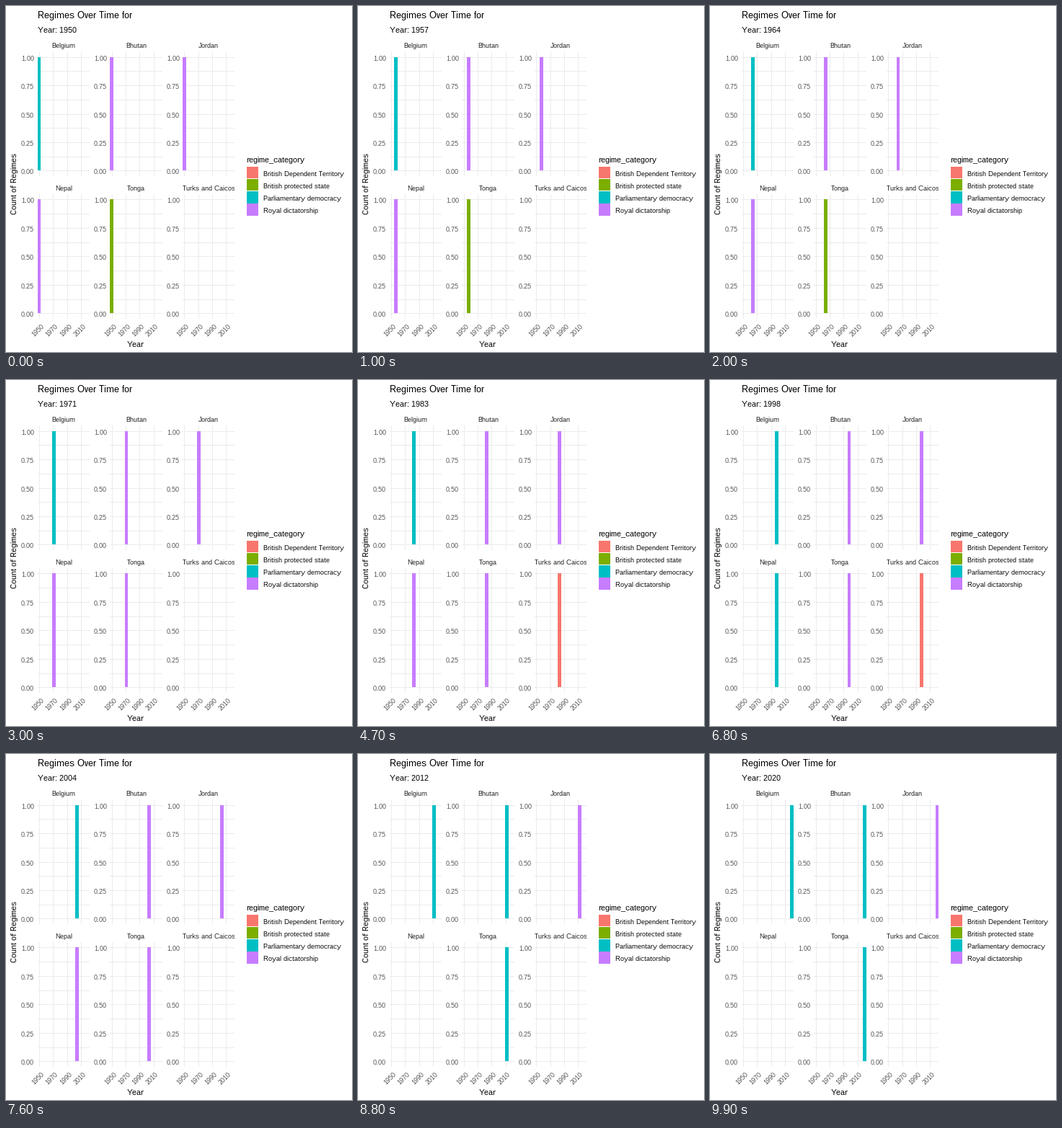
Animation, 480 px wide and 480 px high, one loop 10000 ms. Source, as a matplotlib script:

```python
import matplotlib.pyplot as plt
from matplotlib.animation import FuncAnimation
from matplotlib.patches import Rectangle

SIZE, DPI = 480, 100
FRAMES, INTERVAL = 100, 100
FIRST, LAST = 1950, 2020
SPAN = LAST - FIRST

plt.rcParams.update({
    "font.family": "Liberation Sans",
    "text.hinting": "native",
    "text.hinting_factor": 1,
})

GRID, AXIS_TEXT, DARK = "#EBEBEB", "#4D4D4D", "#1A1A1A"
DEPENDENT, PROTECTED, DEMOCRACY, ROYAL = "#F8766D", "#7CAE00", "#00BFC4", "#C77CFF"
LEGEND = [
    ("British Dependent Territory", DEPENDENT),
    ("British protected state", PROTECTED),
    ("Parliamentary democracy", DEMOCRACY),
    ("Royal dictatorship", ROYAL),
]

# country -> (start year, colour); None means no bar
REGIMES = {
    "Belgium": [(1950, DEMOCRACY)],
    "Bhutan": [(1950, ROYAL), (2008, DEMOCRACY)],
    "Jordan": [(1950, ROYAL)],
    "Nepal": [(1950, ROYAL), (1991, DEMOCRACY), (2002, ROYAL), (2008, None)],
    "Tonga": [(1950, PROTECTED), (1970, ROYAL), (2010, DEMOCRACY)],
    "Turks and Caicos": [(1950, None), (1981, DEPENDENT), (2002, None)],
}

# panel geometry in pixels, y pointing down
LEFT, COL_STEP, PANEL_W = 43.65, 100.69, 72.3
TOP, ROW_STEP, UNIT_H = 70.68, 197.79, 157.76
PAD = UNIT_H * 0.05
BAR_YEARS = 5
PER_YEAR = PANEL_W / (SPAN + BAR_YEARS)

fig = plt.figure(figsize=(SIZE / DPI, SIZE / DPI), dpi=DPI, facecolor="white")
ax = fig.add_axes([0, 0, 1, 1])
ax.set_xlim(0, SIZE)
ax.set_ylim(SIZE, 0)
ax.axis("off")


def box(x0, y0, x1, y1, color, z=1):
    """Filled rectangle on whole pixels."""
    x0, y0, x1, y1 = (round(v) for v in (x0, y0, x1, y1))
    return ax.add_patch(Rectangle((x0, y0), x1 - x0, y1 - y0, facecolor=color,
                                  linewidth=0, antialiased=False, zorder=z))


def label(x, y, s, px, color="black", ha="left", va="baseline", **kw):
    return ax.text(x, y, s, fontsize=px * 72 / DPI, color=color,
                   ha=ha, va=va, zorder=5, **kw)


def draw_panel(name, col, row):
    """Draw one facet and return its bar and left edge."""
    left = LEFT + col * COL_STEP
    right = left + PANEL_W
    top = TOP + row * ROW_STEP
    bottom = top + UNIT_H

    for i in range(9):
        y = round(bottom - UNIT_H * i / 8)
        box(left, y, right, y + 1, GRID)
        if i % 2 == 0:
            label(round(left - 4.5), y + 5, f"{i / 8:.2f}", 9, AXIS_TEXT, "right")

    for year in range(FIRST, LAST, 20):
        x = left + (year - FIRST + BAR_YEARS / 2) * PER_YEAR
        box(round(x), top - PAD, round(x) + 1, bottom + PAD, GRID)
        if row == 1:
            label(x - 1.5, 450.5, str(year), 9, AXIS_TEXT, "center", "center",
                  rotation=45)

    title = label((left + right) / 2, round(top - 12.8), name, 9, DARK, "center")
    strip = Rectangle((round(left), top - 30), round(right) - round(left), 24,
                      transform=ax.transData)
    title.set_clip_path(strip)
    title.set_clip_on(True)

    return box(left, top, left + BAR_YEARS * PER_YEAR, bottom, ROYAL, 3), left


def regime_at(name, year):
    return [color for start, color in REGIMES[name] if start <= year][-1]


label(44, 17, "Regimes Over Time for", 13)
subtitle = label(44, 37, "", 11)
label(180, 473, "Year", 11, ha="center")
label(17, 246.5, "Count of Regimes", 11.4, ha="right", va="center", rotation=90)

label(333, 217, "regime_category", 11)
for i, (text, color) in enumerate(LEGEND):
    key_top = 222.6 + 17.28 * i
    box(334.4, key_top, 350.2, key_top + 16.57, color)
    label(357, round(key_top + 13), text, 9)

panels = {name: draw_panel(name, i % 3, i // 3) for i, name in enumerate(REGIMES)}


def update(k):
    subtitle.set_text(f"Year: {FIRST + round(k * SPAN / (FRAMES - 1))}")
    # bars hold their year until the next one is due
    step = SPAN * (2 * k + 1) // (2 * (FRAMES - 1))
    for name, (bar, left) in panels.items():
        color = regime_at(name, FIRST + step)
        bar.set_visible(color is not None)
        if color:
            x0 = left + step * PER_YEAR
            x1 = x0 + BAR_YEARS * PER_YEAR
            bar.set_x(round(x0))
            bar.set_width(round(x1) - round(x0))
            bar.set_facecolor(color)
    return [subtitle] + [bar for bar, _ in panels.values()]


anim = FuncAnimation(fig, update, frames=FRAMES, interval=INTERVAL,
                     repeat=True, repeat_delay=0, blit=False)
plt.show()
```
